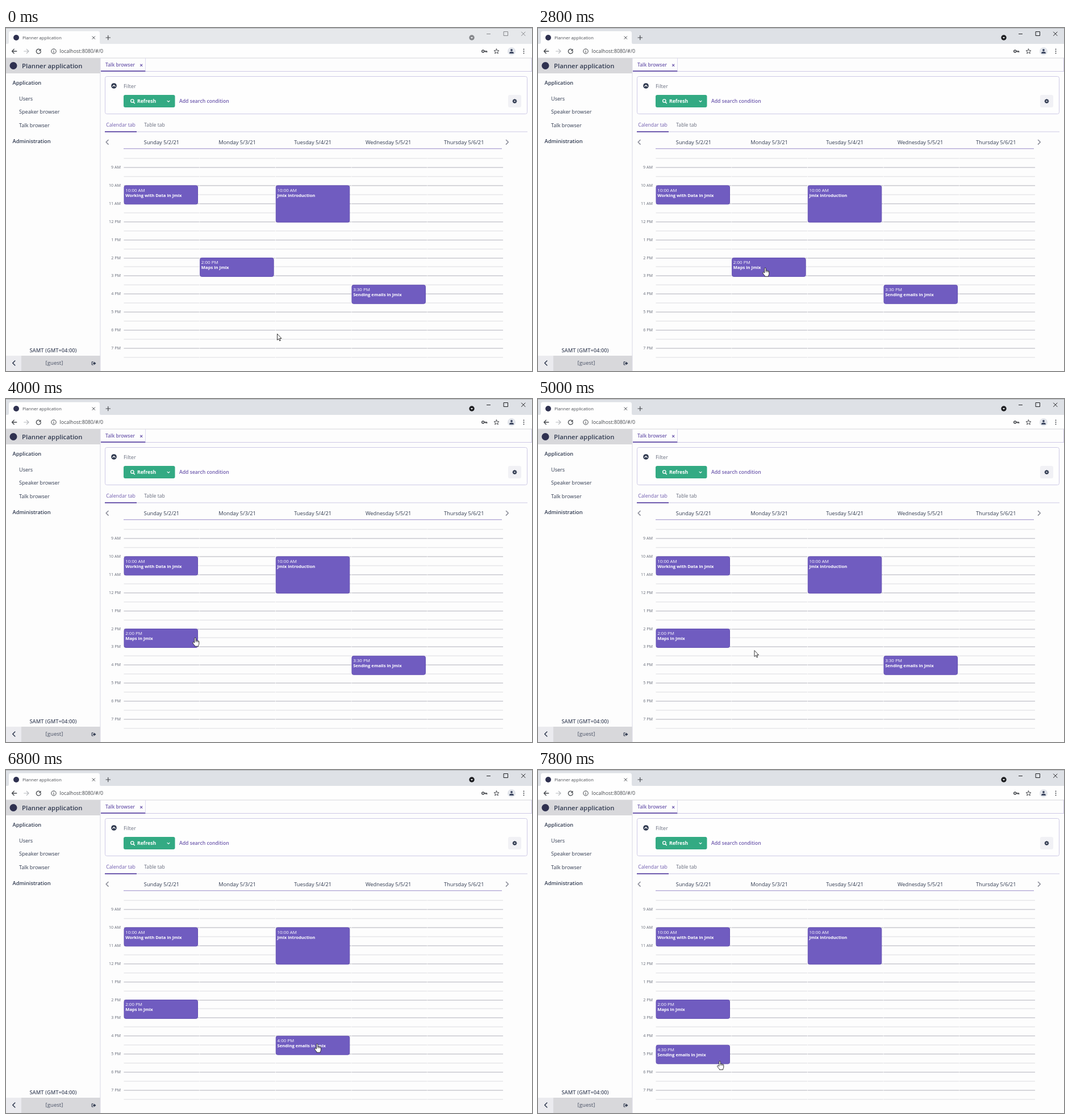
An HTML page that plays this animation: 926x605 px, repeating every 8000 ms.

```html
<!DOCTYPE html>
<html lang="en">
<head>
<meta charset="utf-8">
<title>Planner application</title>
<style>
html, body { margin: 0; width: 100%; height: 100%; overflow: hidden; background: #fdfdfd; }
svg { display: block; font-family: "Open Sans", "Noto Sans", sans-serif; }
.line { fill: none; stroke-linecap: round; stroke-linejoin: round; }
</style>
</head>
<body>
<svg id="stage" width="926" height="605" viewBox="0 0 926 605"></svg>
<script>
const LOOP = 8000, STEP = 200;
const INK = '#303a50', PURPLE = '#6f5bae', EVENT = '#705cc0', LILAC = '#cdc9e6', GREY = '#d8d8db';
const COL = 133.65, LEFT = 207.5, HOUR = 31.9, NINE = 246;

const rect = (x, y, w, h, fill, more = '') =>
  `<rect x="${x}" y="${y}" width="${w}" height="${h}" fill="${fill}" ${more}/>`;
const circle = (x, y, r, fill, more = '') => `<circle cx="${x}" cy="${y}" r="${r}" fill="${fill}" ${more}/>`;
const line = (d, stroke, w = 1, more = '') =>
  `<path class="line" d="${d}" stroke="${stroke}" stroke-width="${w}" ${more}/>`;
// y is the middle of the capitals
const text = (s, x, y, size, fill = INK, weight = 400, anchor = 'start') =>
  `<text x="${x}" y="${y + size * 0.36}" font-size="${size}" fill="${fill}" font-weight="${weight}" text-anchor="${anchor}">${s}</text>`;

function browser() {
  const dark = '#45484d';
  return rect(0, 0, 926, 28.5, '#dee1e6', 'id="bar"') + rect(0, 0, 926, 1, '#b3b5b9') +
    rect(0, 28, 926, 25, '#fefefe') +
    '<path d="M2 28.5Q5 28 5 25V9Q5 5.500 8.500 5.500H161.500Q165 5.500 165 9V25Q165 28 168 28.500Z" fill="#fefefe"/>' +
    circle(18, 17, 5, '#2f3150') +
    text('Planner application', 29, 17, 7.65, '#4b4e54') +
    line('M152 14.800l4.600 4.600m0-4.600l-4.600 4.600', dark) +
    line('M176 17h7.500M179.750 13.250v7.500', dark, 1.2) +
    `<g id="controls">${circle(820, 17, 4.7, 'currentColor')}` +
    '<path d="M817.800 16h4.400l-2.200 2.700z" fill="#eceef1"/>' +
    line('M846.500 10.500h6', 'currentColor') +
    line('M876.500 6.500h7v7h-7z', 'currentColor') +
    line('M907.500 7l6.500 6.500m0-6.500l-6.500 6.500', 'currentColor') + '</g>' +
    line('M18.800 41h-8.300m3.700-3.700l-3.700 3.700 3.700 3.700', dark, 1.3) +
    line('M31.700 41h8.300m-3.700-3.700l3.700 3.700-3.700 3.700', '#b4b7bb', 1.2) +
    line('M60.400 38.600a4 4 0 1 0 .9 2.900', dark, 1.3) + '<path d="M61.500 36.500v4h-4z" fill="#45484d"/>' +
    circle(84, 41, 4.2, 'none', `stroke="${dark}"`) + line('M84 40.700v2.400M84 38.800v.1', dark, 1.1) +
    text('localhost:8080/#/0', 94.5, 41, 8.8, '#44474c') +
    circle(839.8, 41, 2, 'none', `stroke="${dark}" stroke-width="1.6"`) + line('M842 41h4.500v1.500M844.500 41v1.300', dark, 1.5) +
    line('M863.500 36.800l1.200 2.900 3.200.2-2.400 2 .8 3.100-2.800-1.700-2.800 1.700.8-3.100-2.400-2 3.200-.2z', dark) +
    circle(890, 41, 7, '#e2e5eb') + circle(890, 39, 1.9, '#3c4660') +
    '<path d="M886.200 45v-.8q0-2.400 3.800-2.400t3.800 2.400v.8z" fill="#3c4660"/>' +
    [37.5, 41, 44.500].map(y => circle(911.5, y, 1, dark)).join('') +
    rect(0, 52.5, 926, 1, '#d5d6dc');
}

function sidebar() {
  const items = [['Application', 96.5, 600], ['Users', 124.5], ['Speaker browser', 148.2],
    ['Talk browser', 171.6], ['Administration', 199.4, 600]];
  return rect(0, 53, 166, 27, GREY) + circle(13, 66.5, 6.5, '#2f3150') +
    text('Planner application', 28, 66.6, 11.35, INK, 600) +
    items.map(([s, y, w]) => text(s, w ? 11.5 : 23, y, w ? 9.3 : 9.15, INK, w)).join('') +
    text('SAMT (GMT+04:00)', 83, 568.5, 9.3, '#4a5266', 600, 'middle') +
    rect(0, 578, 27, 27, '#ebebef') + rect(27, 578, 139, 27, GREY) +
    line('M15.800 587l-4 4 4 4', INK, 1.6) +
    text('[guest]', 85, 591, 9.6, '#4a5266', 400, 'middle') +
    line('M153.500 588.800h-2.500v5.200h2.500', INK) +
    '<path d="M152.800 590.500h2.200v-2l3.500 3-3.500 3v-2h-2.200z" fill="#303a50"/>' +
    rect(165.5, 53, 1, 552, '#d9d8e6');
}

function panel() {
  const teeth = [0, 45, 90, 135].map(a =>
    rect(894.6, 125.2, 1.8, 7.8, INK, `transform="rotate(${a} 895.500 129.100)"`)).join('');
  return rect(167, 76, 759, 1, LILAC) + rect(167, 75, 78.5, 2, PURPLE) +
    rect(245, 53, 1, 23, '#dddaf0') + rect(925, 53, 1, 24, LILAC) +
    text('Talk browser', 175, 65, 8.5, PURPLE, 600) +
    line('M236.500 64l3.400 3.400m0-3.400l-3.400 3.400', PURPLE, 1.1) +
    rect(174.5, 85.5, 743, 66, '#fefefe', `rx="3" stroke="${LILAC}"`) +
    circle(190, 102, 4.8, INK) + line('M187.800 103l2.200-2.200 2.200 2.200', '#fff', 1.3) +
    text('Filter', 207, 102.3, 9.3, '#6b7080') +
    rect(207, 118, 90.5, 22, '#33aa83', 'rx="3"') +
    circle(222.300, 128.5, 2.7, 'none', 'stroke="#fff" stroke-width="1.3"') + line('M224.400 130.800l2 2', '#fff', 1.5) +
    text('Refresh', 231, 129.2, 8.7, '#fff', 700) +
    line('M284 128.300l2 2 2-2', '#fff', 1.1) +
    text('Add search condition', 305, 129.2, 8.65, PURPLE, 600) +
    rect(884, 118, 23, 22, '#f1f1f5', 'rx="3"') + circle(895.5, 129.1, 3, INK) + teeth + circle(895.5, 129.1, 1.2, '#f1f1f5') +
    text('Calendar tab', 176.3, 171.3, 8.65, PURPLE) + text('Table tab', 243.3, 171.3, 8.6, '#666b7c') +
    rect(174, 182.5, 744, 1, LILAC) + rect(174, 182, 56, 2, PURPLE);
}

function calendar() {
  const days = ['Sunday', 'Monday', 'Tuesday', 'Wednesday', 'Thursday'];
  let out = line('M180 197.500l-3.800 3.800 3.800 3.800', '#8a8c98', 1.6) + line('M880.500 197.500l3.800 3.800-3.800 3.800', '#8a8c98', 1.6) +
    rect(207, 212, 666, 1.5, '#b9b0da');
  days.forEach((d, i) => out += text(`${d} 5/${i + 2}/21`, 274 + i * 133.05, 201.5, 9.25, INK, 400, 'middle'));
  for (let i = -1; i < 22; i++) {
    const y = Math.round(NINE + i * HOUR / 2) - 0.5, half = i & 1;
    for (let c = 0; c < 5; c++)
      out += rect((LEFT + c * COL).toFixed(1), y, COL - 0.7, 1, half ? '#dcdce0' : '#b0b0b9');
    if (!half) {
      const h = 9 + i / 2;
      out += text(`${(h - 1) % 12 + 1} ${h < 12 ? 'AM' : 'PM'}`, 202, y, 7.2, '#666b78', 400, 'end');
    }
  }
  return out;
}

const clock = h => `${(Math.floor(h) - 1) % 12 + 1}:${h % 1 ? '30' : '00'} ${h < 12 ? 'AM' : 'PM'}`;
const place = (day, h) => `translate(${LEFT + day * COL} ${NINE + (h - 9) * HOUR - 0.5})`;
const talk = (id, title, day, h, hours = 1) => `<g id="${id}" transform="${place(day, h)}">` +
  rect(0.5, 0.5, 129.5, hours * HOUR + 1, EVENT, 'rx="3" stroke="#6552b2"') +
  text(clock(h), 2.7, 8.5, 7.95, '#fff') + text(title, 2.7, 17.6, 7.65, '#fff', 700) + '</g>';

const arrow = '<path id="arrow" d="M.5.5V11.400L3 9.100 4.700 12.900 6.300 12.200 4.700 8.500H8Z" fill="#fff" stroke="#222" stroke-width=".9"/>';
const hand = '<g id="hand"><path d="M-1.200 9V1.200Q-1.200 0 0 0T1.200 1.200V5Q2.500 4.300 3.200 5.300 4.500 4.700 5.100 5.800 6.700 5.500 6.800 7V10.500Q6.800 12.500 5.700 13.500V15.200H-.7V14Q-2.800 12-4.300 9.200-4.700 7.800-3.300 7.800-2.200 8-1.200 9Z" fill="#fff" stroke="#222" stroke-width=".9"/>' +
  line('M1.200 5v2.600M3.200 5.600v2M5.100 6v1.800', '#222', 0.7) + '</g>';

stage.innerHTML = rect(0, 0, 926, 605, '#fdfdfd') + browser() + panel() + sidebar() + calendar() +
  talk('data', 'Working with Data in Jmix', 0, 10) + talk('intro', 'Jmix introduction', 2, 10, 2) +
  talk('maps', 'Maps in Jmix', 1, 14) + talk('mail', 'Sending emails in Jmix', 3, 15.5) +
  `<g id="pointer">${arrow}${hand}</g>`;

const $ = id => document.getElementById(id);

// time, x, y of the pointer tip
const path = [[0, 477, 539], [800, 477, 539], [2000, 424, 432.5], [2800, 400, 423], [3400, 333, 421],
  [4200, 333, 421], [5000, 380.5, 443], [5200, 380.5, 443], [6000, 636.5, 490], [6200, 636.5, 490],
  [6400, 628, 476], [6600, 624, 471], [7200, 395, 507], [7400, 365, 511], [7600, 335, 512.5], [7800, 320, 513.5], [LOOP, 320, 513.5]];
// time, day, hour
const moves = {
  maps: [[0, 1, 14], [3200, 0, 14]],
  mail: [[0, 3, 15.5], [6800, 2, 16], [7000, 1, 16], [7400, 1, 16.5], [7600, 0, 16.5]]
};
const grips = [[2000, 4400], [6400, LOOP]];

function pointerAt(t) {
  const i = path.findIndex(p => p[0] > t), [t0, x0, y0] = path[i - 1], [t1, x1, y1] = path[i];
  const k = (t - t0) / (t1 - t0);
  return [x0 + (x1 - x0) * k, y0 + (y1 - y0) * k];
}

function draw(now) {
  const t = Math.floor(now % LOOP / STEP) * STEP;
  const active = t >= 2400, grip = grips.some(([a, b]) => t >= a && t < b);
  $('bar').setAttribute('fill', active ? '#dee1e6' : '#e6e8eb');
  $('controls').setAttribute('color', active ? '#1d1e21' : '#85878b');
  for (const id in moves) {
    const [, day, h] = moves[id].filter(m => m[0] <= t).pop();
    $(id).setAttribute('transform', place(day, h));
    $(id).querySelector('text').textContent = clock(h);
  }
  $('pointer').setAttribute('transform', `translate(${pointerAt(t)})`);
  $('arrow').style.display = grip ? 'none' : '';
  $('hand').style.display = grip ? '' : 'none';
}

function tick() {
  draw(performance.now());
  requestAnimationFrame(tick);
}
tick();
</script>
</body>
</html>
```
